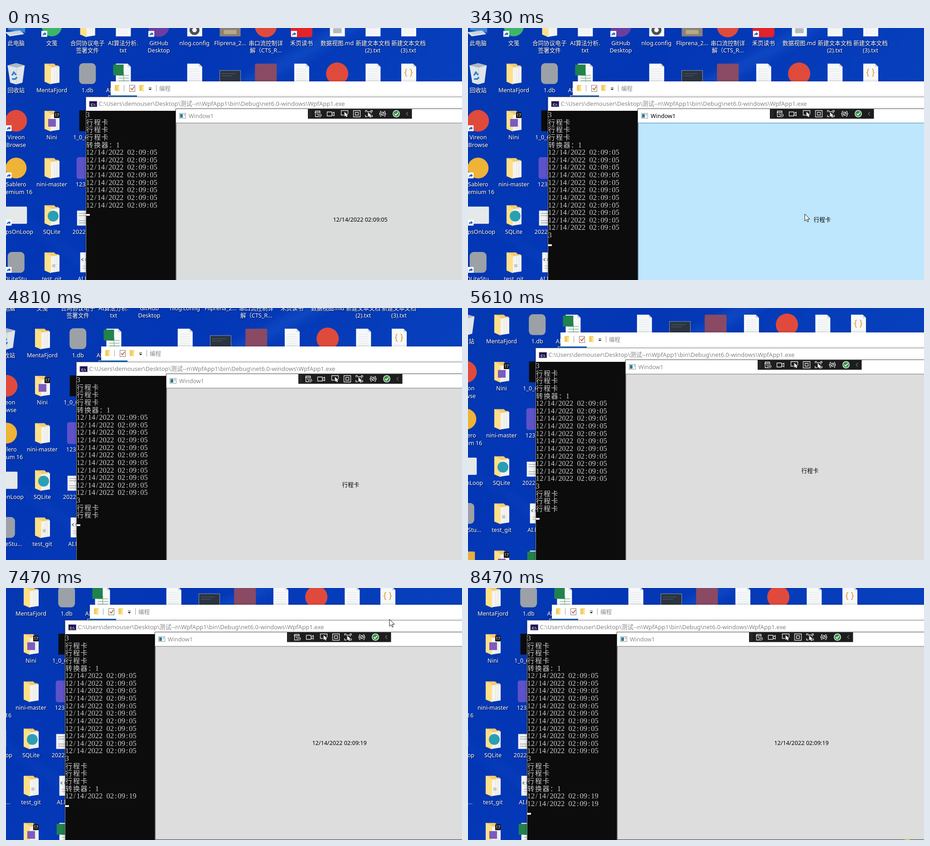
An HTML page that plays this animation: 1006 px wide and 557 px high, repeating every 8.6 s.

```html
<!DOCTYPE html>
<html lang="zh">
<head>
<meta charset="utf-8">
<title>Desktop recording</title>
<style>
html, body { margin: 0; width: 100%; height: 100%; overflow: hidden; background: #0538b4; }
svg { display: block; width: 100vw; height: 100vh; }
text { font: 12.6px "Noto Sans", "Noto Sans CJK SC", "Noto Sans CJK", sans-serif; white-space: pre; }
.label { fill: #fff; text-anchor: middle; }
.labels { filter: drop-shadow(1px 1px 1px rgba(0, 0, 0, .75)); }
.path { font-size: 13.12px; fill: #868686; }
.grey { fill: #8a8a8a; }
.mid { text-anchor: middle; }
.con { font: 16.5px "Liberation Serif", serif; fill: #ccc; text-anchor: middle; }
.han { font: 15px "Noto Sans CJK SC", "Noto Sans CJK", sans-serif; font-weight: 300; }
</style>
</head>
<body>
<svg id="stage" viewBox="0 0 1006 557" preserveAspectRatio="none" xmlns="http://www.w3.org/2000/svg"></svg>
<script>
const LOOP = 8600;
const EARLY = '12/14/2022 02:09:05', LATE = '12/14/2022 02:09:19', CARD = '行程卡', CONV = '转换器：1';

// [start, end, steps, x, y]: stepped moves, one after another
const CAMERA = [
  [4620, 4810, 4, -21, -33], [4880, 5350, 7, -27, -64], [5810, 5880, 2, -30, -67],
  [6020, 6220, 4, -35, -71], [6610, 6610, 1, -37, -73], [6680, 6740, 2, -46, -81]
];
const MOUSE = [
  [2170, 2830, 10, 738, 416], [2990, 3430, 7, 743, 411], [3490, 3820, 6, 775, 330],
  [3890, 4480, 10, 850, -25], [7470, 7470, 1, 846, 69], [7540, 7540, 1, 930, 330],
  [7610, 7610, 1, 1030, 400], [7940, 7940, 1, 997, 503], [8010, 8210, 4, 940, 460],
  [8280, 8470, 4, 965, 562]
];
const HOVER = [[2310, 4087], [7540, 7610], [8010, 8470]];
const PRESS = [2830, 2990];
const ACTIVE = [2830, 4480];

const LINES = [
  [0, '3'], ...Array(3).fill([0, CARD]), [0, CONV], ...Array(8).fill([0, EARLY]),
  [650, EARLY], [1640, EARLY], [2630, EARLY], [2990, '3'],
  [3630, CARD], [4620, CARD], [5610, CARD], [6610, CONV], [6610, LATE], [7610, LATE]
];
const ROW = 16.63, CELL = 8.27, CON_X = 176.6, CON_Y = 183;

const rect = (x, y, w, h, fill, more = '') => `<rect x="${x}" y="${y}" width="${w}" height="${h}" fill="${fill}" ${more}/>`;
const path = (d, fill, more = '') => `<path d="${d}" fill="${fill}" ${more}/>`;
const disc = (r, fill, x = 0, y = 0) => `<circle cx="${x}" cy="${y}" r="${r}" fill="${fill}"/>`;
const line = (d, stroke = '#e8e8e8', w = 1.3, more = '') => path(d, 'none', `stroke="${stroke}" stroke-width="${w}" ${more}`);
const ring = (x, y, r, w, more = '') => `<circle cx="${x}" cy="${y}" r="${r}" fill="none" stroke="#e8e8e8" stroke-width="${w}" ${more}/>`;
const text = (x, y, s, cls = '', more = '') => `<text x="${x}" y="${y + 4.5}" class="${cls}" ${more}>${s}</text>`;

// desktop icons, drawn around their centre
const sheet = (inside = '') => path('M-16-22H10L17-15V22H-16Z', '#f7f8f9') + path('M10-22V-15H17Z', '#cfd4d8') +
  (inside || line('M-11-10H11M-11-5H11M-11 0H11M-11 5H11M-11 10H11M-11 15H11', '#e4e7e9', 1.2));
const folder = (inside = '') => path('M-16-22H5L9-18H15V18H-16Z', '#f0cb72') +
  path('M-4-13L17-16V20L-3 23Z', '#f4f4f1') + line('M6-14V21M11-14V20', '#dcdedd', .8) +
  path('M-16-22L-2-16V24L-16 18Z', '#ffe08a') + inside;
const square = (w, h, fill, r = 3) => rect(-w / 2, -h / 2, w, h, fill, `rx="${r}"`);
const arrow = rect(-23, 10, 13, 13, '#fff') + path('M-20 21V18Q-20 15-16 15V12.5L-11.5 16.5L-16 20V17.5Q-18 17.5-20 21Z', '#1b62c4');
const badge = rect(5, -19, 12, 13, '#161616', 'rx="1"') + text(11, -13.5, '17', 'label', 'style="font-size:8.5px"');
const app = (fill, r = 24) => disc(r, fill) + arrow;
const disk = square(37, 46, '#9ba1a6', 9);
const solution = folder(rect(-8, -4, 17, 17, '#7d5bbe') + badge);
const bin = path('M-19-18L0-23L19-18L14 20L0 24L-13 20Z', '#dfe5e9') + path('M-19-18L0-23L19-18L1-13Z', '#aeb8c0') +
  line('M1-13V23', '#c2cbd1', 1) + line('M-9 4L-5-3L0 3M2 8L-2 12H-9', '#2f7fd0', 3.5);
const monitor = path('M-18-14L20-20V14L-18 8Z', '#3f86cf') + path('M-24 13L8 9L18 17L-14 22Z', '#dfe7ee') + line('M-18 14L9 11M-14 17L12 14', '#9aaab8', 1);
const gear = sheet(disc(11, '#4b5054', 0, 8) + disc(5, '#f7f8f9', 0, 8));
const chart = sheet(line('M-10 4H13M-10 10H13M-10 16H13M1-2V18', '#8dbb9f', 1.5) + rect(-22, -20, 23, 24, '#21824c'));
const red = '#e04a3c';

// [column, row, icon, label, second line]
const ICONS = [
  [0, 0, monitor, '此电脑'],
  [1, 0, app('#3fb56b', 22), '文笺'],
  [2, 0, folder(), '合同协议电子', '签署文件'],
  [3, 0, sheet(), 'AI算法分析.', 'txt'],
  [4, 0, app('#6b3fa0', 23), 'GitHub', 'Desktop'],
  [5, 0, gear, 'nlog.config'],
  [6, 0, rect(-23, -6, 46, 28, '#8b8275') + rect(-14, 8, 28, 9, '#b7a98c'), 'Fliprena_2...'],
  [7, 0, disc(24, red), '串口流控制详', '解（CTS_R...'],
  [8, 0, square(48, 48, '#e2232a', 6) + arrow, '禾页读书'],
  [9, 0, sheet(rect(-9, 4, 19, 11, '#b4bac0', 'rx="2"')), '数据视图.md'],
  [10, 0, sheet(), '新建文本文档', '(2).txt'],
  [11, 0, sheet(), '新建文本文档', '(3).txt'],
  [0, 1, bin, '回收站'],
  [1, 1, folder(), 'MentaFjord'],
  [2, 1, disk, '1.db'],
  [3, 1, chart, 'AI算法汇总表', 'Data01.xlsx'],
  [5, 1, sheet(), ''],
  [6, 1, rect(-23, -7, 46, 30, '#2b3440', 'stroke="#8b97a5"') + line('M-19 0H12M-19 5H4', '#566374', 1), ''],
  [7, 1, square(48, 44, '#8a4a63'), ''],
  [8, 1, sheet(), ''],
  [9, 1, disc(24.5, red), ''],
  [10, 1, sheet(), ''],
  [11, 1, sheet(text(0, -1, '{ }', 'mid', 'style="font-size:19px;fill:#d79a35"')), ''],
  [0, 2, app(red), 'Vireon', 'Browse'],
  [1, 2, solution, 'Nini'],
  [2, 2, rect(-18, -23, 36, 46, '#0b0b0d'), '1_0_6.mp4'],
  [0, 3, app('#efb338', 23), 'Sablero', 'Premium 16'],
  [1, 3, folder(), 'nini-master'],
  [2, 3, square(48, 48, '#5d52c9', 5), '123.mp4'],
  [0, 4, square(48, 38, '#e6e9ea', 2) + arrow, 'ClipsOnLoop'],
  [1, 4, folder(disc(12, '#2a9fb4', 3, 2)), 'SQLite'],
  [2, 4, rect(-23, -10, 46, 33, '#f1f2f2') + line('M-19-4H15M-19 1H15M-19 12H15M-19 17H9', '#a6acb0', 1.6), '2022-12-14'],
  [0, 5, disk + arrow, 'SQLiteStu...'],
  [1, 5, folder(rect(1, 4, 7, 7, '#c5cbd0')), 'test_git'],
  [2, 5, sheet(disc(9, '#2b8a86', 4, -6) + line('M-9-9L-13-6L-9-3', '#555', 1.4) + line('M-11 8H11M-11 13H11', '#bcc2c6', 1.6)), 'AI.html'],
  [0, 6, square(40, 40, '#e5b040'), ''],
  [1, 6, solution, ''],
  [2, 6, chart, '']
];

function desktop() {
  let pics = '', labels = '';
  for (const [c, r, icon, a, b] of ICONS) {
    const x = 22.3 + 78.7 * c, y = 104.3 * r;
    pics += `<g transform="translate(${x} ${y - 3.5})">${icon}</g>`;
    labels += text(x, y + 33, a, 'label') + (b ? text(x, y + 49.5, b, 'label') : '');
  }
  return pics + `<g class="labels">${labels}</g>`;
}

const wallpaper = rect(-10, -10, 1100, 680, 'url(#sky)') +
  '<g filter="url(#soft)" opacity=".45">' +
  line('M500 140Q640 70 800-30', '#2a6ddc', 18) + line('M-20 400Q90 440 250 590', '#1b55cb', 8) + '</g>';

const smallFolder = x => rect(x, 126, 10, 13, '#f3cb60') + rect(x + 6, 128, 4, 12, '#ffe394');
const explorer = rect(231, 118, 900, 60, '#fff', 'filter="url(#drop)"') +
  rect(231, 149, 58, 4, '#1565b8') + smallFolder(240) + smallFolder(294) +
  rect(272.5, 126.5, 12, 14, '#fff', 'stroke="#777"') + line('M275 133L278 136.5L283 129.5', '#d0541f', 1.8) +
  line('M260.5 126V140M331.5 126V140', '#9a9a9a', 1) + line('M315 131.5H321', '#333', 1) +
  path('M314.5 134H321.5L318 137.5Z', '#222') + text(338, 133, '编程', 'grey');

const terminal = rect(176.5, 152.5, 900, 600, '#fff', 'stroke="#8b8b8b" filter="url(#drop)"') +
  rect(184, 162, 16.5, 12, '#1c1547', 'stroke="#6d55a8"') +
  text(192, 167, 'C:\\', 'mid', 'style="font-size:7.5px;font-weight:700;fill:#fff"') +
  text(204.5, 167.5, 'C:\\Users\\demouser\\Desktop\\测试--n\\WpfApp1\\bin\\Debug\\net6.0-windows\\WpfApp1.exe', 'path') +
  rect(177, 183, 900, 600, '#0c0c0c');

const isHan = ch => ch.charCodeAt(0) > 255;

function consoleLine([, s], i) {
  let x = CON_X;
  const chars = [...s].map(ch => {
    const w = isHan(ch) ? CELL * 2 : CELL;
    x += w;
    return `<tspan x="${(x - w / 2).toFixed(2)}"${isHan(ch) ? ' class="han"' : ''}>${ch}</tspan>`;
  });
  return `<text class="con row" y="${CON_Y + ROW * i + 14}">${chars.join('')}</text>`;
}

const pointer = (x, y, fill = 'none') => path(`M${x} ${y}v9l2.3-2 1.7 3.5 1.5-.7-1.6-3.5h3z`, fill, 'stroke="#e8e8e8"');
const toolbar = rect(666, 179, 229.5, 21.5, '#1d1d1f') +
  line('M669.5 182V198M672.5 183V198', '#66666a', 1.2, 'stroke-dasharray="1 2"') +
  line('M689 196H682.5V183.5H692.5V187M681 186.5H694M685 190H688') +
  ring(692, 193, 3.5, 1.5, 'stroke-dasharray="2 .8"') + disc(1.2, '#e8e8e8', 692, 193) +
  line('M708.5 185.5H719V194.5H708.5ZM719 189L724 186V194L719 191') +
  line('M745 192.5H739.5V182.5H754.5V190') + pointer(747, 186, '#e8e8e8') +
  line('M766.5 182.5H781.5V196.5H766.5ZM770.5 186.5H777.5V192.5H770.5Z') +
  line('M793 186V182.5H797M804 182.5H808V186M793 192V196H797M795.5 185H805.5V189M808 192V196H805') + pointer(799, 187, '#e8e8e8') +
  line('M828 184Q825 184 825.5 187Q825.5 189.5 823.5 189.5Q825.5 190 825.5 192Q825 195.5 828 195.5') +
  line('M834 184Q837 184 836.5 187Q836.5 189.5 838.5 189.5Q836.5 190 836.5 192Q837 195.5 834 195.5') +
  ring(831, 189.5, 3.5, 1.3) + line('M828.5 192L833.5 187') +
  disc(8, '#dff0e0', 861, 189.5) + disc(6.5, '#3a8f4a', 861, 189.5) + line('M857.5 189.5L860 192.5L865 186.5', '#fff', 1.8) +
  line('M887 185.5L883 189.5L887 193.5', '#77777b', 1.2);

const appWindow = rect(374.5, 178.5, 800, 459, '#fff', 'stroke="#5b5b5b" filter="url(#drop)"') +
  rect(382.5, 188.5, 14, 11, '#fff', 'stroke="#8d979c"') + rect(384, 190, 6, 8, '#2c7f92') + rect(392, 190, 3, 4, '#b9c7cc') +
  text(403, 194, 'Window1', '', 'id="title"') +
  rect(375.5, 210, 790, 427, '#ddd', 'id="button" stroke="#707070"') +
  text(781.5, 423.5, '', 'mid', 'id="value"') + toolbar;

const stage = document.getElementById('stage');
stage.innerHTML = `<defs>
  <linearGradient id="sky" x1="0" y1="0" x2="1" y2=".5">
    <stop offset="0" stop-color="#0539b0"/><stop offset=".35" stop-color="#0336b5"/><stop offset="1" stop-color="#0843bf"/>
  </linearGradient>
  <filter id="soft" x="-20%" y="-20%" width="140%" height="140%"><feGaussianBlur stdDeviation="12"/></filter>
  <filter id="drop" x="-5%" y="-10%" width="110%" height="120%"><feDropShadow dx="0" dy="1" stdDeviation="3" flood-opacity=".3"/></filter>
</defs>
<g id="world">${wallpaper}${desktop()}${explorer}${terminal}
  ${LINES.map(consoleLine).join('')}${rect(CON_X, 0, 8.3, 4, '#f2f2f2', 'id="caret"')}
  ${appWindow}</g>
<g id="mouse"><circle id="click" r="12" fill="#d8d21c" cx="4" cy="5"/>
  ${path('M0 0V15.5L3.6 12.2 6 17.6 8.3 16.6 6 11.3H11Z', '#fff', 'stroke="#111"')}</g>`;

const el = id => document.getElementById(id);
const [world, mouse, click, caret, title, button, value] =
  ['world', 'mouse', 'click', 'caret', 'title', 'button', 'value'].map(el);
const rows = [...document.querySelectorAll('.row')];
const within = (t, [a, b]) => t >= a && t < b;

function walk(moves, x, y, t) {
  for (const [start, end, n, tx, ty] of moves) {
    if (t < start) break;
    const done = n > 1 ? Math.floor((t - start) / (end - start) * (n - 1) + .001) + 1 : 1;
    const p = Math.min(1, done / n);
    x += (tx - x) * p;
    y += (ty - y) * p;
  }
  return `translate(${Math.round(x)} ${Math.round(y)})`;
}

function draw(t) {
  world.setAttribute('transform', walk(CAMERA, 0, 0, t));
  mouse.setAttribute('transform', walk(MOUSE, 1010, 140, t));

  const count = LINES.filter(l => l[0] <= t).length;
  rows.forEach((r, i) => r.setAttribute('visibility', i < count ? 'visible' : 'hidden'));
  caret.setAttribute('y', Math.round(CON_Y + ROW * count + 12.2));

  const pressed = within(t, PRESS), hover = HOVER.some(h => within(t, h));
  button.setAttribute('fill', pressed ? '#c4e5f6' : hover ? '#bee6fd' : t < 2310 ? '#dadddc' : '#ddd');
  button.setAttribute('stroke', pressed ? '#2c628b' : hover ? '#3c7fb1' : '#707070');
  click.setAttribute('visibility', pressed || t >= 8470 ? 'visible' : 'hidden');
  title.setAttribute('fill', within(t, ACTIVE) ? '#000' : '#8a8a8a');
  value.textContent = t < 2990 ? EARLY : t < 6610 ? CARD : LATE;
}

const begin = performance.now();
function tick() {
  draw((performance.now() - begin) % LOOP);
  requestAnimationFrame(tick);
}
tick();
</script>
</body>
</html>
```
